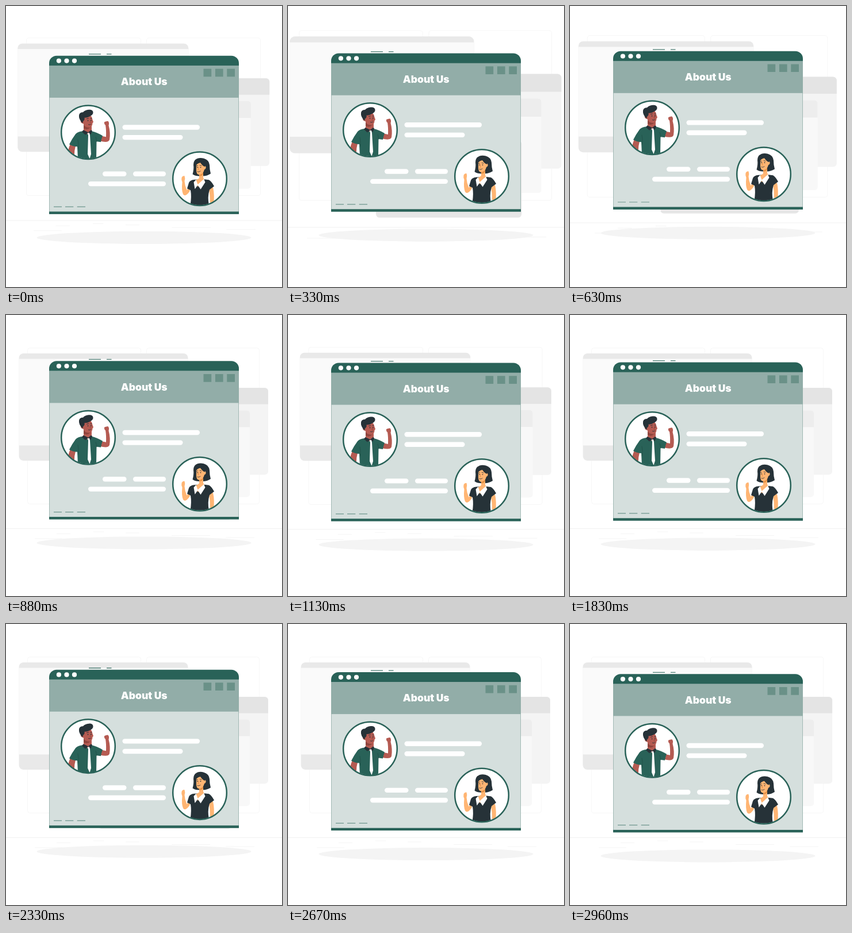
An HTML page that plays this animation: 480 by 490 pixels, repeating every 3000 ms.

```html
<!DOCTYPE html>
<html lang="en">
<head>
<meta charset="utf-8">
<title>About Us</title>
<style>
  html, body { margin: 0; width: 100%; height: 100%; overflow: hidden; background: #fff; }
  svg { display: block; width: 100%; height: 100%; }
  text { font: 900 17.5px Inter, "DejaVu Sans", sans-serif; }
  .dark { fill: #296258; }
  .ink { fill: #263238; }
  .white { fill: #fff; }
  .skin-a { fill: #b55b52; }
  .skin-b { fill: #ffb573; }
  .line { fill: none; stroke-linecap: round; stroke-linejoin: round; }
</style>
</head>
<body>
<svg viewBox="0 0 480 490">
  <defs>
    <clipPath id="clipA"><circle cx="143" cy="221" r="46"/></clipPath>
    <clipPath id="clipB"><circle cx="337" cy="302" r="46"/></clipPath>
  </defs>

  <g id="backdrop">
    <g fill="none" stroke="#f7f7f7">
      <rect x="37.5" y="57.5" width="197" height="272" rx="4"/>
      <rect x="244.5" y="57.5" width="196" height="272" rx="4"/>
    </g>
    <path d="M-30 372.5H510" stroke="#f1f1f1"/>
    <path d="M88 381.5h24M152 378h18M208 380h24M50 390h48M288 384.5h67M382 388h50" stroke="#f5f5f5"/>

    <rect x="22.5" y="67" width="294" height="187" rx="8" fill="#e9e9e9"/>
    <rect x="22.5" y="76.5" width="294" height="151" fill="#fafafa"/>

    <rect x="300" y="127" width="156" height="151.5" rx="6" fill="#f4f4f4"/>
    <path d="M300 155.5V127H450a6 6 0 0 1 6 6v22.5z" fill="#e4e4e4"/>
    <rect x="300" y="166.5" width="124" height="151" rx="5" fill="#f8f8f8"/>
    <path d="M300 195.5v-29H419a5 5 0 0 1 5 5v24z" fill="#ededed"/>
    <rect x="160" y="233" width="232.5" height="124" rx="6" fill="#e6e6e6"/>
  </g>

  <g id="float">
    <ellipse cx="240" cy="404.6" rx="186.5" ry="11" fill="#f4f4f4"/>
    <path d="M144 84.6h21M175 84.6h8.5" stroke="#4b7d73" stroke-width="1.3"/>

    <rect x="75.4" y="104" width="329.2" height="259" fill="#d5dfdd" stroke="#92ada8" stroke-width=".8"/>
    <path class="dark" d="M75 105V100.5a13 13 0 0 1 13-13H392a13 13 0 0 1 13 13V105z"/>
    <rect x="75" y="104.6" width="330" height="56" fill="#92ada8"/>
    <rect class="dark" x="75" y="359.2" width="330" height="4.4"/>
    <g class="white">
      <circle cx="91.9" cy="96.3" r="4.1"/>
      <circle cx="105.5" cy="96.3" r="4.1"/>
      <circle cx="119" cy="96.3" r="4.1"/>
      <text x="240.2" y="138.8" text-anchor="middle">About Us</text>
    </g>
    <path d="M343.5 110.2h13.7v13.7h-13.7zM363.9 110.2h13.7v13.7h-13.7zM384.3 110.2h13.7v13.7h-13.7z" fill="#6a9188"/>
    <g class="white" id="bars"></g>
    <path d="M83 350.8h14M103 350.8h14.3M123.7 350.8h14.3" stroke="#6f968e" stroke-width="1.2"/>

    <circle class="white" cx="143" cy="221" r="47"/>
    <g clip-path="url(#clipA)">
      <path class="skin-a" d="M112 241L121 245Q118 255 119 268H106Q107 252 112 241z"/>
      <path class="skin-a" d="M164 227L174 229Q174.500 217 173 208.500Q170.500 207 171 203Q175 201 177.500 201.500Q180 204 178.500 209Q182 222 180 234Q178 240 163 236z"/>
      <path class="dark" d="M134 219Q125 219.500 121 224Q115 232 110 242Q117 246 124 246L125 268H157L157.500 237L165 238Q166 232 168 227Q158 221 149 219z"/>
      <path d="M125 234Q127 242 125.500 250M157.500 237Q157 231 156 229" class="line" stroke="#1f4c44" stroke-width=".7"/>
      <path class="skin-a" d="M135 205V219L143 225L149 219V207z"/>
      <path d="M135 208Q140 213 147 212.500Q141 218 135 214z" fill="#8f443d"/>
      <path class="ink" d="M134.500 217L132 220L138 225.500L143 221.500L147.500 225L150 218.500L148 217L143 221z"/>
      <path class="white" d="M141.500 222.500L145 222L146 226L148 259L145.500 267L142 259L143 226z"/>
      <path class="skin-a" d="M134.500 193Q143 187 149 194Q150 198 152 203L150.500 205Q150.500 211 145 212.500Q137 213 134.500 206Q129 205 130 200Q132 198 134 200z"/>
      <path class="ink" d="M133 205Q126 198 127 191Q128 186 134 186Q137 182 144 181.500Q151 181 151.500 186Q152 190 146 193Q141 196 136.500 195.500Q137 200 134.500 201z"/>
      <path class="line" d="M140.500 197.500l3-.8M147 197l2-.2M143.500 207.500q2.500 1 4-.5" stroke="#263238" stroke-width=".9"/>
      <circle class="ink" cx="142.500" cy="200.500" r=".9"/>
      <circle class="ink" cx="147.800" cy="200.300" r=".9"/>
      <path class="line" d="M146 201l1.500 3.500h-1.700" stroke="#8f443d" stroke-width=".7"/>
    </g>
    <circle cx="143" cy="221" r="46.800" fill="none" stroke="#296258" stroke-width="2.500"/>

    <circle class="white" cx="337" cy="302" r="47"/>
    <g clip-path="url(#clipB)">
      <path class="skin-b" d="M318 316L314.500 322Q311 314 310.500 306Q312 301 310.500 297Q307 296.500 305.500 300Q304.500 304 306.500 308Q305 322 308 329Q312 335 320 323z"/>
      <path class="skin-b" d="M353 319L360 317Q363 330 361 347L355 343Q355 331 353 319z"/>
      <path class="ink" d="M328 303.500Q320 304 318 309L315 319L321 322Q323 333 320.500 348H353Q350 334 354 321L362 315Q357 306 353 304L345 303z"/>
      <path class="ink" d="M329 269Q335 264 344 266.500Q353 269 354 278Q354 286 356 293Q349 298 339 297Q330 298 324.500 294Q327 285 326 278Q326 272 329 269z"/>
      <path class="skin-b" d="M336 290V301L330 305L333.500 316L345 304L343 300V289z"/>
      <path d="M336.500 294.500Q341 293 343 289V294Q340 298 336.500 297.500z" fill="#e79143"/>
      <path class="white" d="M330.500 303.500L326.500 308L328.500 320L333.500 313L338.500 320.500L346.500 308L344 302.500L333.500 312z"/>
      <path class="skin-b" d="M331 277Q335 273 340 273Q344 278 347 280Q349 284 345 286Q343 294 336 295Q331.500 295 331 288z"/>
      <path class="ink" d="M330 280Q332 275 338 274Q342 280 346 281L348 276L341 269L331 272z"/>
      <path class="line" d="M331.500 279.500l2-.5M337 278.500l3 .7M333 289.500q2.500 1.500 5-.8" stroke="#263238" stroke-width=".8"/>
      <circle class="ink" cx="333" cy="282" r=".85"/>
      <circle class="ink" cx="338.500" cy="282" r=".85"/>
      <path class="line" d="M335 282l-1.300 4h1.500" stroke="#e07f3a" stroke-width=".7"/>
    </g>
    <circle cx="337" cy="302" r="46.800" fill="none" stroke="#296258" stroke-width="2.500"/>
  </g>
</svg>
<script>
  const LOOP = 3000, BOB = 1500, RISE = 9.6, BOB_LEAD = 55;
  const CENTER = [239, 222];
  // Two swelling beats, then a rest: [time, scale].
  const BEATS = [[-42, 1], [374, 1.1], [776, 1], [1105, 1], [1420, 1.1], [1794, 1], [2958, 1], [3374, 1.1]];

  const backdrop = document.getElementById("backdrop");
  const float = document.getElementById("float");

  document.getElementById("bars").innerHTML = [
    [202.5, 208, 134.5], [202.5, 225.6, 105], [168, 289.2, 41.5], [221, 289.2, 57], [143, 306.6, 135]
  ].map(([x, y, w]) => `<rect x="${x}" y="${y}" width="${w}" height="8.4" rx="4.2"/>`).join("");

  function beatScale(t) {
    const i = BEATS.findIndex(([time]) => time > t);
    const [t0, s0] = BEATS[i - 1], [t1, s1] = BEATS[i];
    return s0 + (s1 - s0) * (t - t0) / (t1 - t0);
  }

  function render(t) {
    const phase = (t + BOB_LEAD) % BOB / BOB;
    const lift = RISE * (1 - Math.abs(1 - 2 * phase));
    const [cx, cy] = CENTER;
    float.setAttribute("transform", `translate(0 ${-lift})`);
    backdrop.setAttribute("transform", `translate(${cx} ${cy}) scale(${beatScale(t)}) translate(${-cx} ${-cy})`);
  }

  const start = performance.now();
  function tick() {
    render((performance.now() - start) % LOOP);
    requestAnimationFrame(tick);
  }
  tick();
</script>
</body>
</html>
```
